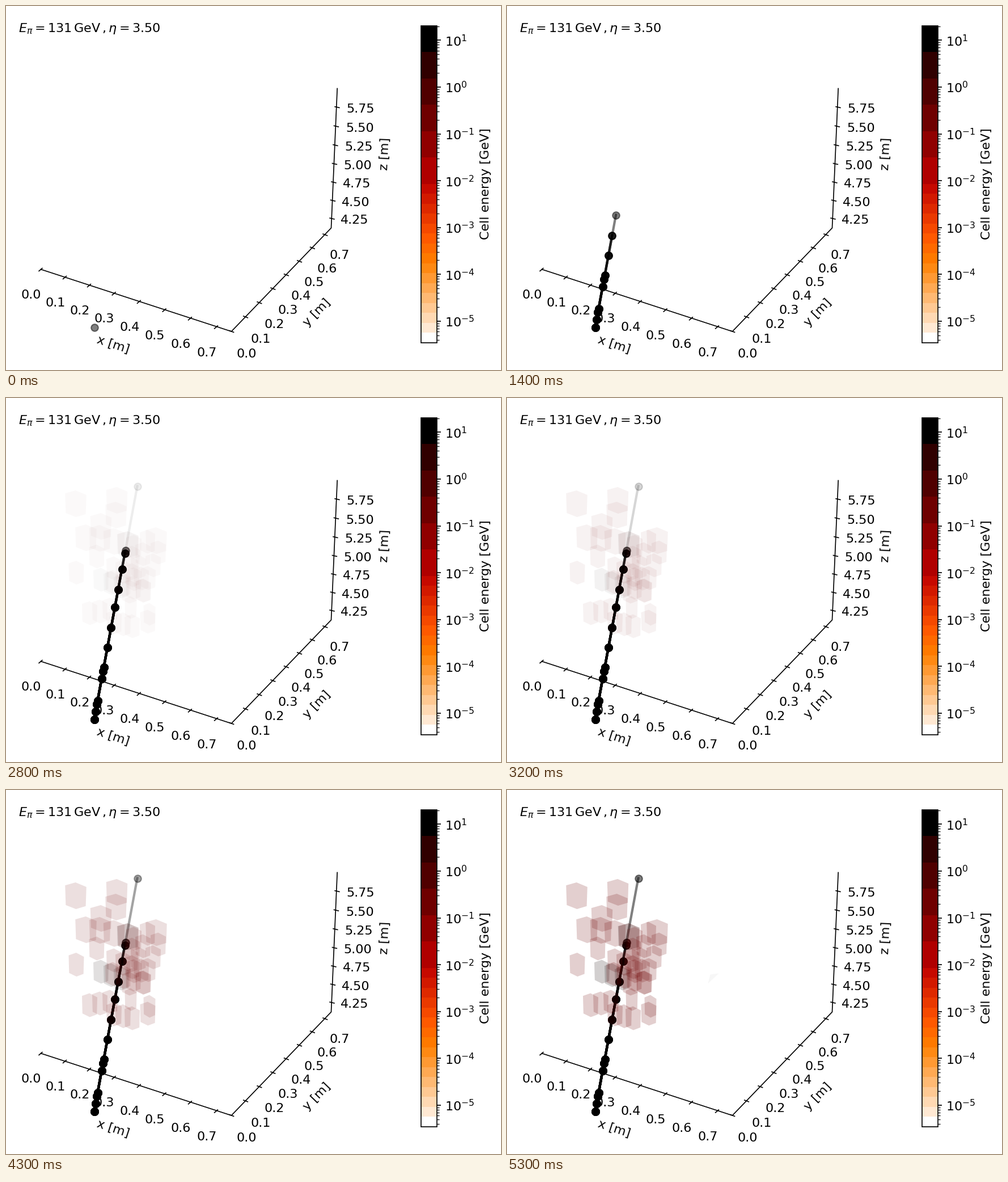
A matplotlib script for the animation above (6.3 s loop, 873 by 642 pixels).

```python
import numpy as np
import matplotlib.pyplot as plt
from matplotlib.animation import FuncAnimation
from matplotlib.patches import Polygon, Rectangle

W, H, DPI = 873, 642, 128
PT = 72 / DPI                     # points per pixel
FONT = 22.3 * PT
THIN = 1.67 * PT

plt.rcParams["font.family"] = "DejaVu Sans"
fig = plt.figure(figsize=(W / DPI, H / DPI), dpi=DPI, facecolor="white")
ax = fig.add_axes([0, 0, 1, 1])
ax.set_xlim(-0.5, W - 0.5)
ax.set_ylim(H - 0.5, -0.5)
ax.axis("off")


def label(x, y, s, ha="center", va="center", rot=0):
    ax.text(x, y, s, ha=ha, va=va, rotation=rot, fontsize=FONT, zorder=3)


def stroke(x0, y0, x1, y1, width=THIN):
    ax.plot([x0, x1], [y0, y1], color="black", lw=width, zorder=2,
            solid_capstyle="butt")


def in_perspective(a, b, n, k):
    """n points from a to b, evenly spaced in depth; k sets the foreshortening."""
    t = np.linspace(0, 1, n)[:, None]
    return np.array(a) + (np.array(b) - a) * t / (t + k * (1 - t))


def scale(ticks, labels, values, fmt, k, tick):
    n = len(values)
    for x, y in in_perspective(*ticks, n, k):
        stroke(x - tick[0], y - tick[1], x + tick[0], y + tick[1])
    for (x, y), v in zip(in_perspective(*labels, n, k), values):
        label(x, y, fmt.format(v))


# three axes of the box
corners = [(61, 464), (397, 573.5), (573, 391), (583.7, 145)]
ax.plot(*zip(*corners), color="black", lw=THIN, zorder=2)
tenths = np.arange(8) / 10
scale([(60.5, 464.5), (370, 566)], [(44, 509), (353.5, 612)],
      tenths, "{:.1f}", 1.047, (3.5, -3))
scale([(397.3, 573.5), (562.3, 403)], [(424, 613.5), (587.5, 440)],
      tenths, "{:.1f}", 0.945, (4.5, 1.7))
scale([(574.5, 374.5), (583.5, 178)], [(614.5, 378), (625, 181.5)],
      4.25 + np.arange(7) / 4, "{:.2f}", 1.035, (4.7, 1.1))
label(188, 597, "x [m]", rot=-18)
label(548, 540, "y [m]", rot=46)
label(668, 260, "z [m]", rot=87.5)
label(22, 46, r"$E_\pi = 131\,\mathrm{GeV}\,, \eta = 3.50$",
      ha="left", va="baseline")

# colour bar
LEFT, RIGHT, TOP, BOTTOM = 731, 759, 34, 593
span = BOTTOM - TOP
edges = np.concatenate([np.linspace(0, 0.5, 7), np.linspace(0.5, 1, 17)[1:]])
levels = (edges[:-1] + edges[1:]) / 2
levels[0], levels[-1] = 0, 1
heat = plt.get_cmap("gist_heat")
for a, b, level in zip(edges, edges[1:], levels):
    ax.add_patch(Rectangle((LEFT, TOP + a * span), RIGHT - LEFT,
                           (b - a) * span, fc=heat(level), lw=0,
                           aa=False, zorder=1))
ax.add_patch(Rectangle((LEFT, TOP), RIGHT - LEFT, span, fill=False,
                       ec="black", lw=THIN, zorder=2))


def bar_y(exponent):
    return 142.5 - 82.55 * exponent


for e in range(-6, 2):
    for m in range(1, 10):
        y = bar_y(e + np.log10(m))
        if not TOP < y < BOTTOM:
            continue
        if m > 1:
            stroke(RIGHT, y, RIGHT + 4.3, y, 1.25 * PT)
        else:
            stroke(RIGHT, y, RIGHT + 7.5, y)
            label(774, y, rf"$\mathdefault{{10^{{{e}}}}}$", ha="left",
                  va="center_baseline")
label(846, 313, "Cell energy [GeV]", rot=90)


# particle track: every step draws the whole path again at half opacity
def path(ys, **kw):
    ys = np.array(ys, float)
    xs = 155 + 76 * (566 - ys) / 411
    return ax.plot(xs, ys, "-o", color="black", lw=4.2 * PT,
                   ms=12.5 * PT, mew=2.08 * PT, **kw)[0]


hits = [566, 552, 539, 533, 494, 481, 474, 439, 404, 368, 337, 301, 273, 268.5]
STEPS = 23
reached = np.interp(np.arange(STEPS), [0, 7, 14, 21, 22], [0, 4, 9, 12, 13])
steps = [path(hits[:n + 1], alpha=0.5, zorder=4)
         for n in reached.round().astype(int)]
tail = path([268.5, 155], zorder=5)

# detector cells: rows of equal hexagons
HEX = np.array([(-.5, -.39), (-.01, -.5), (.5, -.33),
                (.47, .39), (.01, .5), (-.47, .35)])
BIG, MID, SMALL = (37.5, 47), (27, 42), (21, 40)
RED, DARK = (0.43, 0, 0), (0.08, 0.02, 0.02)
cells = []


def row(start, step, count, size=MID, colour=RED):
    for k in range(count):
        centre = np.array(start) + np.array(step) * k
        cells.append(ax.add_patch(Polygon(HEX * size + centre, fc=colour,
                                          lw=0, zorder=6)))


row((122.5, 186), (72.5, -6), 2, BIG)
row((193.5, 206), (-26.5, 20), 3, BIG)
row((165, 247), (25, 5.5), 3, BIG)
row((264.5, 251), (0, 0), 1, BIG)
row((214, 258), (0, 0), 1, BIG, DARK)
row((268, 272), (-9, 22.5), 4)
row((249, 253), (-8, 22), 5)
row((225, 262), (-3, 19), 3)
row((159.5, 279), (-36, 28.5), 2)
row((190, 300), (16, 6), 4)
row((167, 320), (18, 6), 3, MID, DARK)
row((188, 324), (18, 5), 4)
row((147, 379), (18, -3), 3)
row((190, 395), (16, 3.5), 3)
row((249.5, 394), (0, 0), 1)
row((252.5, 381), (-33, -12), 2, SMALL)
faint = ax.add_patch(Polygon([(354, 341), (358, 325), (373, 323), (361, 334)],
                             fc="0.97", lw=0, zorder=6))

FADE_START, FADE_STEPS = 25, 28


def built_up(alpha, n):
    return 1 - (1 - alpha) ** n


def update(i):
    for k, line in enumerate(steps):
        line.set_visible(k <= i)
    n = min(max(i - FADE_START, 0), FADE_STEPS)
    tail.set_alpha(built_up(0.0245, n))
    for cell in cells:
        cell.set_alpha(built_up(0.0075, n))
    faint.set_visible(n == FADE_STEPS)
    return []


anim = FuncAnimation(fig, update, frames=63, interval=100, repeat=True,
                     repeat_delay=0, init_func=lambda: update(0))
plt.show()
```
